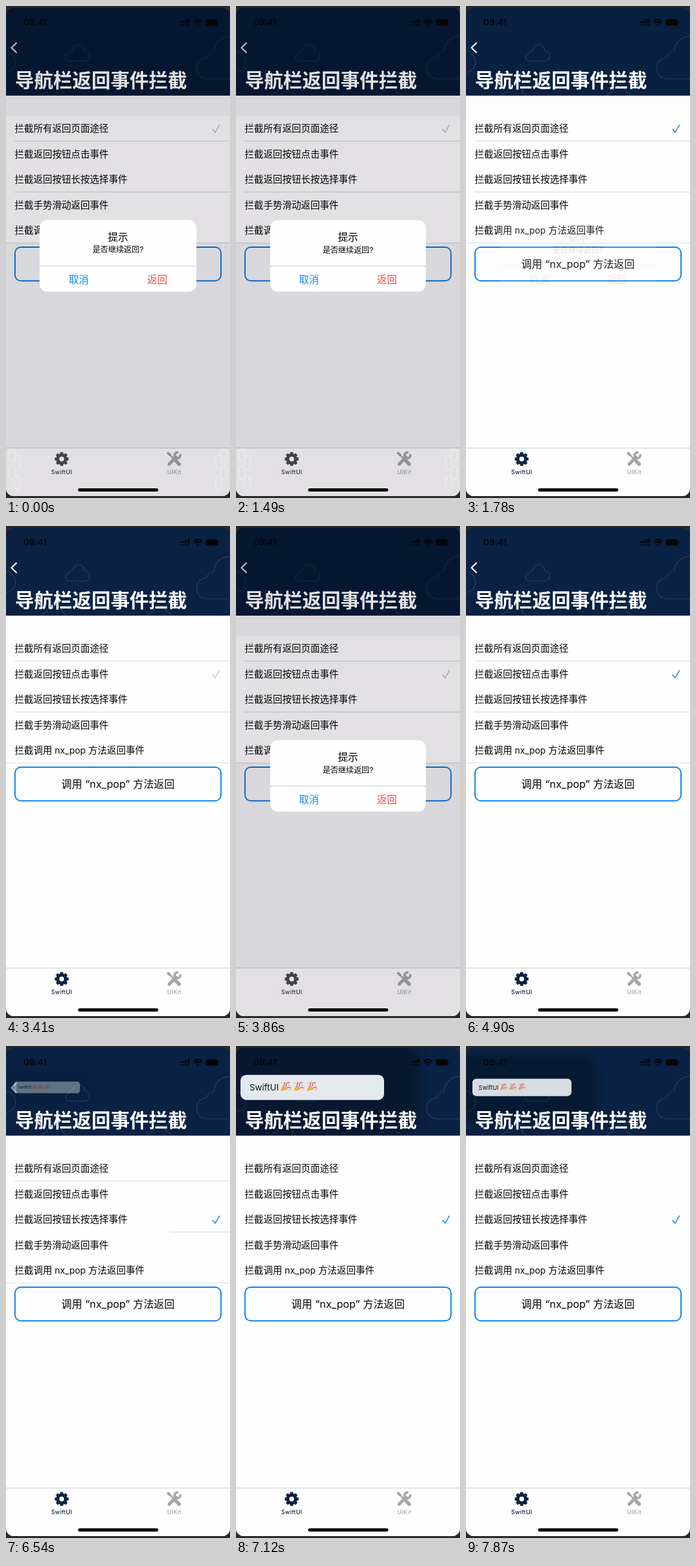
An HTML page for the animation above (8 s loop, 348x763 px).

```html
<!DOCTYPE html>
<html lang="zh">
<head>
<meta charset="utf-8">
<style>
html, body { margin: 0; width: 100%; height: 100%; overflow: hidden; background: #29292b; }
svg { display: block; width: 348px; height: 763px; }
text { font-family: Inter, "Noto Sans CJK SC", "Noto Sans CJK", sans-serif; }
.mid { text-anchor: middle; }
.line { fill: none; stroke-linecap: round; stroke-linejoin: round; }
</style>
</head>
<body>
<svg viewBox="0 0 348 763">
  <defs>
    <clipPath id="screen"><rect y="3" width="348" height="757" rx="12"/></clipPath>
    <clipPath id="bar"><rect y="3" width="348" height="136"/></clipPath>
    <filter id="soft" x="-30%" y="-50%" width="160%" height="200%"><feGaussianBlur stdDeviation="9"/></filter>
    <g id="popper">
      <path d="M1 14 5 4 12 11Z" fill="#f3bd45"/>
      <path d="M3 9 7 13M4.5 6 10 12" stroke="#c98b35" stroke-width="1"/>
      <path class="line" d="M7 5Q6 2 8 0M9 7Q11 5 10 2Q12 0 15 1M11 9Q14 7 17 9" stroke="#e2607c" stroke-width="1.5"/>
      <path class="line" d="M3 1h.1M14 5h.1M15 12h.1" stroke="#eda24b" stroke-width="2"/>
    </g>
    <g id="chain" class="line" stroke="#fff" stroke-width="2.5">
      <rect x="5" y="687" width="9" height="19" rx="4.5"/>
      <rect x="13" y="697" width="9" height="21" rx="4.5"/>
      <rect x="5" y="713" width="9" height="21" rx="4.5"/>
      <rect x="13" y="729" width="9" height="21" rx="4.5"/>
    </g>
  </defs>
  <g clip-path="url(#screen)">
    <rect id="ground" y="139" width="348" height="621"/>
    <rect id="rows" y="170" width="348" height="197"/>
    <rect id="tabs" y="685" width="348" height="75"/>
    <g id="chains"><use href="#chain"/><use href="#chain" transform="matrix(-1 0 0 1 348 0)"/></g>
    <rect id="head" y="3" width="348" height="136"/>
    <g clip-path="url(#bar)">
      <g id="clouds" class="line" stroke="#fff" stroke-width="1.2">
        <path d="M99 85.5a6 6 0 0 1-1-12a6 6 0 0 1 6-5a9 9 0 0 1 18 1a8 8 0 0 1 0 16Z"/>
        <path d="M352 113H313a13 13 0 0 1-1-33a13 13 0 0 1 11-10a24 24 0 0 1 29-22"/>
        <path d="M-4 70a14 14 0 0 1 4 33"/>
        <path d="M54 141a10 10 0 0 1 10-7a12 12 0 0 1 24 1a9 9 0 0 1 6 6"/>
        <path d="M219 141a8 8 0 0 1 8-7a12 12 0 0 1 23 0a9 9 0 0 1 8 7"/>
      </g>
      <g id="shade">
        <rect x="-58" y="-75" width="335" height="152" rx="36" fill="#000" opacity=".28" filter="url(#soft)"/>
      </g>
    </g>
    <text x="27" y="30" font-size="13.5" font-weight="600" fill="#040507">09:41</text>
    <g fill="#040507">
      <path d="M270 24h3v2.5h-3ZM274.2 23h3v3.500h-3ZM278.4 21.500h3v5h-3ZM282.600 20h3v6.500h-3Z"/>
      <path d="M270 28.500h3v2h-3ZM274.200 28.500h3v2h-3ZM278.400 28.500h3v2h-3ZM282.600 28.500h3v2h-3Z"/>
      <rect x="310.500" y="20.500" width="18.500" height="10" rx="3"/>
      <path d="M330 23.500q2 2 0 4Z"/>
    </g>
    <path class="line" stroke="#040507" stroke-width="2.400" d="M292 23.500q6-5 12 0M294.500 26.300q3.500-3 7 0M298 29h.1"/>
    <text id="title" x="14" y="125.500" font-size="29.700" font-weight="600">导航栏返回事件拦截</text>
    <g id="list" font-size="14.600" fill="#050506"></g>
    <g id="seps">
      <path d="M13 209.500H348M0 367.500H348"/>
      <path id="sep"/>
    </g>
    <path id="check" class="line" d="M321 191.500l4 4.500 6.500-11.500" stroke-width="1.400"/>
    <rect id="box" x="14" y="374" width="320" height="52.200" rx="9" stroke-width="1.900"/>
    <text class="mid" x="174" y="405.500" font-size="16.200" fill="#050506">调用 “nx_pop” 方法返回</text>
    <path id="edge" d="M0 685.500H348"/>
    <g id="gear" fill="none">
      <circle cx="86.500" cy="702.500" r="6.200" stroke-width="5"/>
      <g id="teeth" stroke-width="4.600"></g>
    </g>
    <g id="tools" class="line">
      <path d="M253.500 710.500 264 700" stroke-width="5"/>
      <path d="M269.500 694a4.500 4.500 0 1 0 .2 6" stroke-width="3.600" transform="rotate(-45 266 697)"/>
      <path d="M252.500 694 262 703.500" stroke-width="2.500"/>
      <path d="M252 693.500l2.500 2.500" stroke-width="4"/>
      <path d="M264.500 706 269 710.500" stroke-width="5.600"/>
    </g>
    <g class="mid" font-size="8.800" font-weight="500" letter-spacing=".35">
      <text id="tab1" x="86.500" y="726">SwiftUI</text>
      <text id="tab2" x="261.500" y="726">UIKit</text>
    </g>
    <rect x="112" y="748" width="124.500" height="5" rx="2.500" fill="#000"/>

    <g id="alert">
      <rect x="-121" y="-55.500" width="242" height="111" rx="12" fill="#fefefe"/>
      <path d="M-121 16H121" stroke="#c9c9cc"/>
      <g class="mid">
        <text y="-23.500" font-size="15.500" font-weight="500">提示</text>
        <text y="-5" font-size="12.100">是否继续返回?</text>
        <g font-size="15.500">
          <text x="-60.500" y="42" font-weight="500" fill="#0a8cf8">取消</text>
          <text x="60.500" y="42" fill="#f84848">返回</text>
        </g>
      </g>
    </g>

    <path id="tip" d="M16 56.500 7.500 64.500 16 72.500Z" fill="#dfe5eb"/>
    <g id="menu">
      <rect y="-19.500" width="223" height="39" rx="9" fill="#e4e9ee"/>
      <text x="14" y="4.800" font-size="13.400" fill="#111">SwiftUI</text>
      <use href="#popper" x="61" y="-8"/>
      <use href="#popper" x="81.300" y="-8"/>
      <use href="#popper" x="101.600" y="-8"/>
    </g>
    <path id="back" class="line" d="M16 57.500 8.500 64.800 16 72" stroke="#fff" stroke-width="2.200"/>
  </g>
</svg>
<script>
const LOOP = 8000, TICK = 148.3;
const $ = id => document.getElementById(id);
const set = (id, o) => { for (const k in o) $(id).setAttribute(k, o[k]); };
const clamp = x => Math.min(1, Math.max(0, x));
const hex = h => [0, 2, 4].map(i => parseInt(h.substr(i, 2), 16));
const mix = (a, b, k) => {
  const p = hex(a), q = hex(b);
  return `rgb(${p.map((v, i) => Math.round(v + (q[i] - v) * k))})`;
};
const track = (keys, t) => {
  if (t <= keys[0][0]) return keys[0][1];
  for (let i = 1; i < keys.length; i++) {
    const [t0, a] = keys[i - 1], [t1, b] = keys[i];
    if (t <= t1) return a + (b - a) * (t - t0) / (t1 - t0);
  }
  return keys[keys.length - 1][1];
};

const ROW = 39.5;
$('list').innerHTML = ['拦截所有返回页面途径', '拦截返回按钮点击事件', '拦截返回按钮长按选择事件',
  '拦截手势滑动返回事件', '拦截调用<tspan font-size="13.9"> nx_pop </tspan>方法返回事件']
  .map((s, i) => `<text x="13.5" y="${195.3 + i * ROW}">${s}</text>`).join('');
$('teeth').innerHTML = Array.from({ length: 8 }, (_, i) =>
  `<path d="M86.5 695.5V691.8" transform="rotate(${i * 45} 86.5 702.5)"/>`).join('');

// Each alert: opening time, closing time
const ALERTS = [[-305, 1505], [3395, 4008]];
const SIZE = [[6300, .38], [6525, .46], [6690, .85], [6840, 1.02], [6980, 1], [7600, 1], [7715, .94], [7860, .69]];
const FADE = [[6350, 0], [6525, .4], [6690, .9], [6830, 1], [7600, 1], [7860, .94]];

function drawAlert(t) {
  const [open, close] = ALERTS[t < 3000 ? 0 : 1];
  const p = clamp((t - open) / 450);
  const shown = Math.min(1, Math.pow(p * 1.6, 1.5));
  const dim = shown * (1 - clamp((t - close) / 310));
  const scale = 1 + .2 * Math.pow(1 - p, 3);
  set('alert', { transform: `translate(174 387.5) scale(${scale})`, opacity: dim });
  return { dim, grey: dim > 0 && t < close };
}

function drawPage(t, dim, grey) {
  const deep = dim ** 3;
  const cell = mix('fefefe', 'e2e0e3', deep);
  const ground = dim < .5
    ? mix('fefefe', 'ebebf1', clamp(2.5 * dim - .25))
    : mix('ebebf1', 'd7d7dc', 2 * dim - 1);
  set('ground', { fill: ground });
  set('rows', { fill: cell });
  set('tabs', { fill: cell });
  set('head', { fill: mix('0a2243', '051731', dim) });
  set('clouds', { opacity: .13 - .05 * dim });
  set('title', { fill: mix('ffffff', 'e4e2e6', deep) });
  set('chains', { opacity: t < 1550 ? .22 * dim : 0 });
  set('seps', { stroke: mix('dededf', 'b9b9bd', dim), opacity: t < 6650 ? 1 : 0 });
  set('sep', { d: `M${t > 6380 ? 255 : 13} 288.5H348` });
  set('edge', { stroke: mix('cfcfd1', 'b2b2b6', dim) });
  set('box', { fill: ground, stroke: mix('0f84ec', '0b69c7', dim) });
  const row = t < 2510 ? 0 : t < 5180 ? 1 : 2;
  set('check', {
    transform: `translate(0 ${row * ROW})`,
    stroke: grey ? mix('c8c8ca', 'a0a0a3', dim) : '#0d7de0'
  });
  const ink = mix('0c2144', '444347', dim);
  set('gear', { stroke: ink });
  set('tab1', { fill: mix('0c2144', '2f2f32', dim) });
  const pale = mix('a6a6a9', '929296', dim);
  set('tools', { stroke: pale });
  set('tab2', { fill: pale });
}

function drawMenu(t, dim) {
  const s = track(SIZE, t), a = track(FADE, t);
  const at = `translate(${16.5 - 9.5 * s} 64.2) scale(${s})`;
  set('menu', { transform: at, opacity: a });
  set('shade', { transform: at, opacity: a ** 3 });
  set('tip', { opacity: a < .8 ? a * .6 : 0 });
  const pressed = t > 5900 && t < 6380;
  set('back', { opacity: a > 0 ? clamp(.85 - a) : pressed ? .55 : 1 - .26 * dim });
}

function draw(now) {
  const t = Math.floor((now % LOOP + 3) / TICK) * TICK;
  const { dim, grey } = drawAlert(t);
  drawPage(t, dim, grey);
  drawMenu(t, dim);
}

let start;
function frame(now) {
  if (start === undefined) start = now;
  draw(Math.max(0, now - start));
  requestAnimationFrame(frame);
}
draw(0);
requestAnimationFrame(frame);
</script>
</body>
</html>
```
